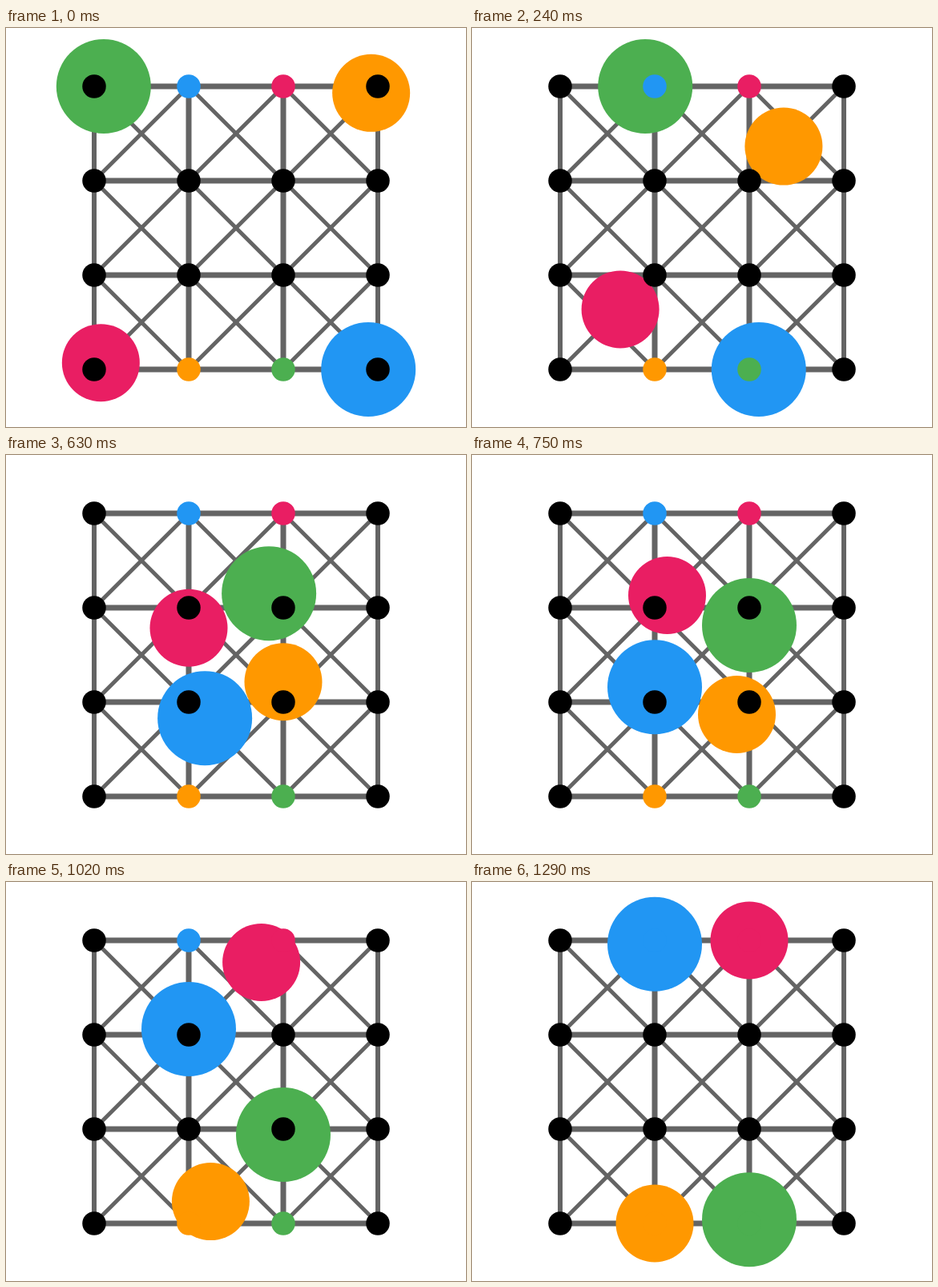
These frames come from a looping animation (574 px wide and 499 px high, 1320 ms). An HTML page with a canvas:

```html
<!DOCTYPE html>
<html lang="en">
<head>
<meta charset="utf-8">
<title>Agents on a grid</title>
<style>
  html, body { margin: 0; width: 100%; height: 100%; overflow: hidden; background: #fff; }
  canvas { display: block; }
</style>
</head>
<body>
<canvas id="stage" width="574" height="499"></canvas>
<script>
const ctx = document.getElementById('stage').getContext('2d');
const CELL = 118, LEFT = 110, TOP = 73, SIZE = 4;
const STEP_MS = 30, STEPS = 44, SPEED = 0.1; // speed in cells per step
const GREEN = '#4caf50', BLUE = '#2196f3', PINK = '#e91e63', ORANGE = '#ff9800';

// Each stop is [column, row, steps to wait there].
const agents = [
  { color: GREEN, radius: 59, path: [[0, 0], [1, 0], [2, 1], [2, 2, 0.27], [2, 3]] },
  { color: BLUE, radius: 59, path: [[3, 3], [2, 3, 0.27], [1, 2], [1, 1], [1, 0]] },
  { color: PINK, radius: 48.5, path: [[0, 3], [1, 2], [1, 1], [2, 0]] },
  { color: ORANGE, radius: 48.5, path: [[3, 0], [2, 1], [2, 2], [1, 3]] },
];

const px = col => LEFT + col * CELL;
const py = row => TOP + row * CELL;

function disc(col, row, radius, color) {
  ctx.fillStyle = color;
  ctx.beginPath();
  ctx.arc(px(col), py(row), radius, 0, Math.PI * 2);
  ctx.fill();
}

function line(c1, r1, c2, r2, width) {
  ctx.lineWidth = width;
  ctx.beginPath();
  ctx.moveTo(px(c1), py(r1));
  ctx.lineTo(px(c2), py(r2));
  ctx.stroke();
}

function drawEdges() {
  const last = SIZE - 1;
  ctx.strokeStyle = '#646464';
  for (let i = 0; i < SIZE; i++) {
    line(0, i, last, i, 7);
    line(i, 0, i, last, i % last ? 7 : 6);
  }
  for (let i = 0; i < last; i++) {
    line(i, 0, last, last - i, 5);
    line(last - i, 0, 0, last - i, 5);
    if (i) {
      line(0, i, last - i, last, 5);
      line(last, i, i, last, 5);
    }
  }
}

function positionAt(path, step) {
  let left = step;
  for (let i = 0; i < path.length - 1; i++) {
    const [c1, r1, wait = 0] = path[i];
    const [c2, r2] = path[i + 1];
    const duration = Math.hypot(c2 - c1, r2 - r1) / SPEED;
    left -= wait;
    if (left < duration) {
      const k = Math.max(0, left) / duration;
      return [c1 + (c2 - c1) * k, r1 + (r2 - r1) * k];
    }
    left -= duration;
  }
  return path[path.length - 1];
}

function drawNodes() {
  const goals = new Map(agents.map(({ path, color }) => [path[path.length - 1].slice(0, 2).join(), color]));
  for (let row = 0; row < SIZE; row++) {
    for (let col = 0; col < SIZE; col++) {
      disc(col, row, 14.75, goals.get(`${col},${row}`) || '#000');
    }
  }
}

function render(now) {
  const step = Math.floor(now / STEP_MS) % STEPS + 1;
  ctx.fillStyle = '#fff';
  ctx.fillRect(0, 0, 574, 499);
  drawEdges();
  for (const { path, radius, color } of agents) {
    disc(...positionAt(path, step), radius, color);
  }
  drawNodes();
}

let start;
function tick(now) {
  start ??= now;
  render(now - start);
  requestAnimationFrame(tick);
}
render(0);
requestAnimationFrame(tick);
</script>
</body>
</html>
```
